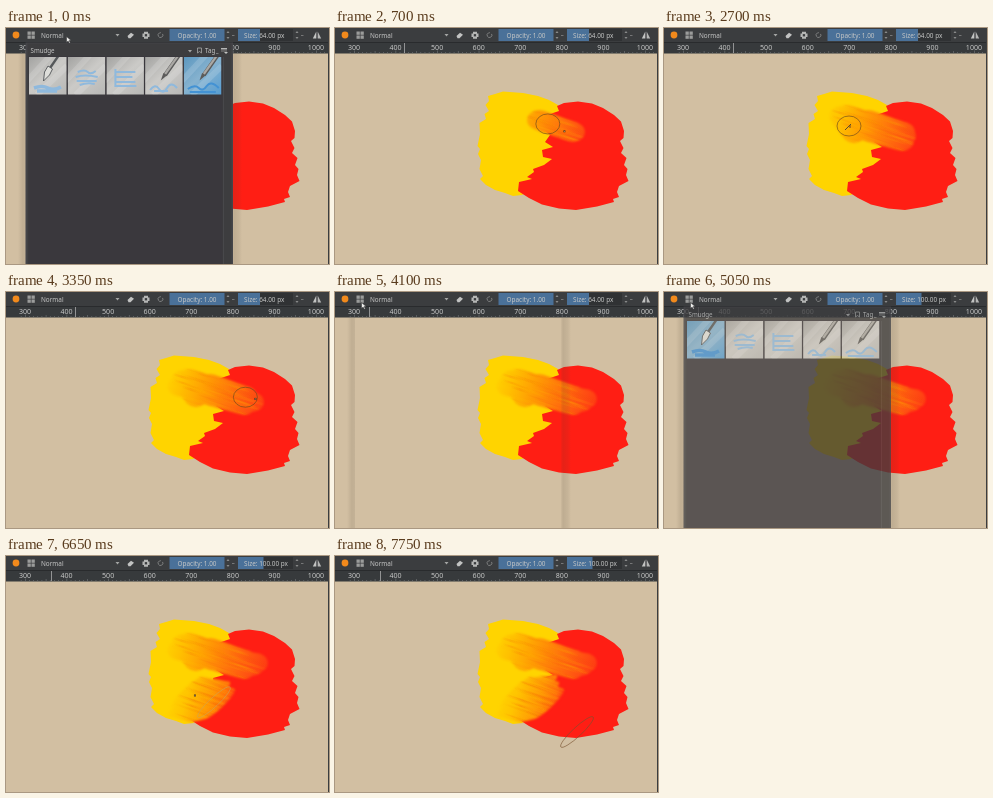
An HTML page with a canvas that plays this animation: 323x236 px, repeating every 7800 ms.

```html
<!DOCTYPE html>
<html>
<head>
<meta charset="utf-8">
<style>
html, body { margin: 0; width: 100%; height: 100%; overflow: hidden; background: #d2bfa2; }
canvas { display: block; }
</style>
</head>
<body>
<canvas id="stage" width="323" height="236"></canvas>
<script>
const W = 323, H = 236, LOOP = 7800, TAU = Math.PI * 2;
const g = document.getElementById('stage').getContext('2d');
const FONT = '"Noto Sans", "Open Sans", sans-serif';

const layer = () => Object.assign(document.createElement('canvas'), { width: W, height: H }).getContext('2d');
const clamp = v => Math.max(0, Math.min(1, v));
const ease = u => u * u * (3 - 2 * u);

function rect(c, x, y, w, h) { g.fillStyle = c; g.fillRect(x, y, w, h); }

function text(s, x, y, size = 6.4, color = '#c6c7c6', align = 'left') {
  g.font = `${size}px ${FONT}`;
  g.textAlign = align;
  g.textBaseline = 'alphabetic';
  g.fillStyle = color;
  g.fillText(s, x, y);
}

function shape(d, fill, stroke, width = 1) {
  const p = new Path2D(d);
  if (fill) { g.fillStyle = fill; g.fill(p); }
  if (stroke) { g.strokeStyle = stroke; g.lineWidth = width; g.stroke(p); }
}

function ramp(c, x0, y0, x1, y1, stops) {
  const r = c.createLinearGradient(x0, y0, x1, y1);
  stops.forEach(([at, color]) => r.addColorStop(at, color));
  return r;
}

// Pointer path: time, x, y
const KEYS = [
  [0, 61, 10], [140, 61, 10], [330, 238, 104], [560, 204, 92], [780, 240, 108],
  [960, 192, 91], [1160, 239, 106], [1350, 188, 99], [1560, 238, 113],
  [1760, 183, 87], [2000, 239, 104], [2250, 177, 88], [2450, 190, 105],
  [2600, 185, 98], [2710, 185, 98], [2920, 246, 110], [3120, 173, 94],
  [3330, 250, 107], [3500, 235, 104], [3920, 27, 12], [4150, 27, 12],
  [4450, 42, 49], [4650, 42, 49], [4900, 27, 12], [5120, 27, 12],
  [5560, 232, 148], [5700, 212, 148], [5880, 181, 136], [6060, 208, 141],
  [6220, 178, 145], [6400, 200, 151], [6540, 213, 148], [6700, 182, 137],
  [6860, 206, 134], [6960, 206, 136], [7270, 236, 174], [7500, 242, 176], [LOOP, 242, 176]
];

function pointer(t) {
  let i = 1;
  while (i < KEYS.length - 1 && KEYS[i][0] < t) i++;
  const [a, x, y] = KEYS[i - 1], [b, x2, y2] = KEYS[i];
  const s = ease(clamp((t - a) / (b - a)));
  return [x + (x2 - x) * s, y + (y2 - y) * s];
}

const LAG = 70;
const ROUND = [12, 10, 0], FLAT = [22, 4.5, -0.75];

function nib(path, [x, y], [rx, ry, angle]) {
  path.moveTo(x + rx * Math.cos(angle), y + rx * Math.sin(angle));
  path.ellipse(x, y, rx, ry, angle, 0, TAU);
}

// Blended paint with soft bristle streaks, running down a slight slope
function blend(x0, y0, x1, y1, stops, seed) {
  const c = layer();
  const rnd = () => (seed = (seed * 16807) % 2147483647) / 2147483647;
  c.fillStyle = ramp(c, x0, y0, x1, y1, stops);
  c.fillRect(0, 0, W, H);
  c.filter = 'blur(.6px)';
  const slope = (y1 - y0) / (x1 - x0);
  for (let i = 0; i < 70; i++) {
    const x = x0 + rnd() * (x1 - x0) * .7, len = 15 + rnd() * 35;
    const y = (y0 + y1) / 2 + (x - (x0 + x1) / 2) * slope + (rnd() - .5) * 56;
    const hue = rnd() < .5 ? '255,190,0' : '240,80,10';
    c.strokeStyle = ramp(c, x, y, x + len, y, [[0, `rgba(${hue},0)`], [.5, `rgba(${hue},.16)`], [1, `rgba(${hue},0)`]]);
    c.lineWidth = 1 + rnd() * 2;
    c.beginPath();
    c.moveTo(x, y);
    c.lineTo(x + len, y + len * slope);
    c.stroke();
  }
  return c.canvas;
}

const upper = blend(162, 83, 265, 116, [[0, '#ffd200'], [.15, '#ffc000'], [.38, '#ff9a04'], [.6, '#ff740c'], [.8, '#ff5212'], [1, '#ff3414']], 17);
const lower = blend(168, 133, 226, 153, [[0, '#ffd200'], [.25, '#ffc400'], [.6, '#ff9a06'], [.85, '#ff6d0c'], [1, '#ff2c14']], 91);
const mask = layer();

function smear(texture, brush, from, to, t) {
  if (t < from) return;
  const path = new Path2D();
  for (let s = from, end = Math.min(t, to); s <= end; s += 8) nib(path, pointer(s - LAG), brush);
  mask.globalCompositeOperation = 'source-over';
  mask.clearRect(0, 0, W, H);
  mask.filter = 'blur(1.3px)';
  mask.fill(path);
  mask.filter = 'none';
  mask.globalCompositeOperation = 'source-in';
  mask.drawImage(texture, 0, 0);
  g.drawImage(mask.canvas, 0, 0);
}

const YELLOW = 'M160 66L168 63.5L188 65L203 68L214 72L223 77L224 83L216 88L222 130L197 160L187 167L178 168L170 165L160 162L151 157L145 151L148 148L144.5 141L146 132L143 126L145 121L142.5 118L145 106L144.5 95L151 91L149.5 86L154 83L150.5 77L154 73L153 68Z';
const RED = 'M222 78L229 75L243 73.5L257 75.5L268 80L279 87L286 93.5L289 103L288.5 110L285 113L288.5 120L286 125L291.5 130L289 137L292.5 141L291 147L293.5 153L284 158L282 164L284 169L278 171L279 174L262 178.5L241 182L224 180.5L207 176.5L194 170L183 163L184 154L197 151L192 149L199 144L198 141L209 137L217 131L208 129L207 122L218 119L210 114L215 107L208 100L213 92L209 88L224 83Z';

const BAR = '#3b3d3f', DARK = '#373a3c';

function ruler(t) {
  rect(DARK, 0, 14, W, 11.5);
  rect('#292b2d', 0, 14, W, 1);
  for (let i = -1; i < 80; i++) {
    const x = 19 + i * 4.157;
    rect('#75787a', x, i % 10 ? i % 5 ? 24 : 23 : 22.5, .6, i % 10 ? i % 5 ? 1.5 : 2.5 : 3);
  }
  for (let i = 0; i < 8; i++) text(300 + i * 100, 19 + i * 41.57, 22, 7.1, '#c6c7c6', 'center');
  rect('#a9abab', t < 4000 ? 69 : t < 5150 ? 34 : 45, 15, .8, 10);
}

function toolbar(t) {
  const big = t >= 4600;
  rect(BAR, 0, 0, W, 14);
  g.fillStyle = '#f28a1c';
  g.beginPath();
  g.arc(10, 7, 3.4, 0, TAU);
  g.fill();
  for (const x of [21.5, 25.5]) for (const y of [3.5, 7.5]) rect('#9b9c9b', x, y, 3.3, 3.3);
  text('Normal', 35, 9.6);
  shape('M109.5 6h4l-2 2.5z', '#a5a6a5');
  shape('M121.5 8l3.5-3.2 3 2-3.5 3.4h-2z', '#c2c3c2');
  shape('M136.5 5.5h7v3.6h-7zM138 3.7h4v7h-4z', '#b5b6b5');
  rect(BAR, 138.8, 6.1, 2.3, 2.3);
  g.strokeStyle = '#858686';
  g.lineWidth = .9;
  g.beginPath();
  g.arc(154.5, 7.1, 2.4, -.5, 4.9);
  g.stroke();
  rect('#4a7199', 163.5, 1, 55, 12);
  text('Opacity: 1.00', 171.6, 9.6);
  rect('#303234', 232, 1, 55, 12);
  rect('#4a7199', 232, 1, big ? 25.5 : 22, 12);
  text(`Size: ${big ? '100' : '64'}.00 px`, 238, 9.6);
  for (const x of [222, 291]) {
    shape(`M${x - 1.5} 5h3l-1.5 -2zM${x - 1.5} 9h3l-1.5 2z`, '#8b8c8c');
    rect('#858686', x + 4, 7, 2.5, .8);
  }
  shape('M310.3 3.5v7h-3.5z', '#c2c3c2');
  shape('M311.7 3.5v7h3.5z', '#b5b6b5');
}

const MARKS = [
  'M5 31q8-3 14 0t13-1M8 34h20',
  'M10 15q7-3 10 0t8-1M8 20q9-3 22 0M9 24h20M12 28q8-3 15-1',
  'M9 12v18M10 15h19M10 20h16M9 25h20M10 29h20',
  'M5 33q5-7 9-1t8-1t10 0M9 34h14',
  'M4 32q7-5 11-1t8-2t12 2M6 35h26'
];

function thumb(i, chosen) {
  g.save();
  g.translate(23 + i * 38.7, 29);
  g.beginPath();
  g.rect(0, 0, 37.5, 37.5);
  g.clip();
  g.fillStyle = ramp(g, 0, 0, 34, 38, chosen
    ? [[0, '#5c97bf'], [.5, '#86b2cf'], [1, '#5a9fd2']]
    : [[0, '#a3a3a1'], [.5, '#cbcac7'], [1, '#b9b9b7']]);
  g.fillRect(0, 0, 38, 38);
  shape('M-2 24L22 -2M8 38L38 9', null, 'rgba(255,255,255,.14)', 6);
  g.filter = 'blur(.5px)';
  shape(MARKS[i], null, chosen ? '#4392d4' : '#8fb9dd', i ? 2 : 3.5);
  g.filter = 'none';
  if (i === 0) {
    shape('M30 -2L21 11', null, '#55585a', 2.4);
    shape('M19 9l4.5 3-3 6-6 6 1-9z', '#dededa', '#505356', .9);
  } else if (i > 2) {
    shape('M34 -2L20 18', null, '#5a5a5a', 4);
    shape('M33.5 -2L20 17', null, '#aaa8a4', 2.2);
    shape('M18.3 16l3.4 2.5-6 5z', '#5c5b5a');
  }
  g.restore();
}

// Header and presets, painted once for each possible selection
function makeSheet(chosen) {
  g.clearRect(0, 0, W, H);
  rect('#454549', 19.5, 14.5, 207.5, 222);
  rect('#3d3d3f', 21.5, 15.5, 204, 221);
  rect('#3a383d', 22.5, 28, 194, 208);
  rect('#48484b', 217, 29, 1, 207);
  text('Smudge', 24.5, 25, 6.2);
  shape('M182 22h4l-2 2.5z', '#a5a6a5');
  shape('M191.5 20h4v5l-2-1.5-2 1.5z', null, '#a5a6a5', .8);
  text('Tag', 199, 25, 6.2);
  rect('#8b8c8c', 210, 25, 2.5, .8);
  rect('#b5b6b5', 215, 20, 6, 1.5);
  rect('#858686', 215, 22.5, 6, 1);
  shape('M218 24h4l-2 2z', '#c2c3c2');
  for (let i = 0; i < 5; i++) thumb(i, i === chosen);
  const c = layer();
  c.drawImage(g.canvas, 0, 0);
  return c.canvas;
}
const sheets = { 0: makeSheet(0), 4: makeSheet(4) };

function shadow(x, w, dark, stops) {
  g.fillStyle = ramp(g, x, 0, x + w, 0, stops.map(([at, a]) => [at, `rgba(70,60,45,${a * dark})`]));
  g.fillRect(x, 26, w, 210);
}

function popup(t) {
  const early = t < 2000;
  const alpha = early ? clamp((160 - t) / 110) : clamp((t - 4110) / 120) * clamp((5180 - t) / 165);
  const shade = early ? alpha : clamp((t - 4050) / 50) * clamp((5260 - t) / 160);
  if (shade) {
    shadow(12, 8, shade, [[0, 0], [.6, .13], [1, .1]]);
    shadow(226, 10, shade, [[0, .04], [.2, .14], [.7, .08], [1, 0]]);
  }
  g.globalAlpha = alpha;
  g.drawImage(sheets[t > 4600 ? 0 : 4], 0, 0);
  g.globalAlpha = 1;
}

function cursors(t) {
  const ring = pointer(t - LAG), [x, y] = pointer(t);
  const open = t < 160 || (t > 4050 && t < 5200);
  if (ring[1] > 30 && !open) {
    const path = new Path2D();
    nib(path, ring, t < 4600 ? ROUND : FLAT);
    g.strokeStyle = t < 4600 ? 'rgba(105,72,32,.8)' : t < 6960 ? 'rgba(200,165,90,.7)' : 'rgba(120,82,48,.8)';
    g.lineWidth = .8;
    g.stroke(path);
  }
  if (y < 26 || open) {
    shape(`M${x - .5} ${y - 1.5}v6l1.6-1.4 1.2 2.2 1-.5-1.1-2.2h2z`, '#eeeeec', '#2c2d2e', .5);
  } else if (t > 2500 && t < 2760) {
    shape(`M${x - 4} ${y + 4}L${x + 2} ${y - 2}M${x + 1} ${y - 1}v3`, null, '#5c4a2c', 1);
  } else if (t < 7200) {
    rect('#4c3520', x - 1, y - 1, 2, 2);
    rect('#d8c9a8', x - .3, y - .3, .7, .7);
  }
}

function draw(t) {
  rect('#d2bfa2', 0, 0, W, H);
  shape(YELLOW, '#ffd400');
  shape(RED, '#ff1e14');
  smear(upper, ROUND, 390, 3400, t);
  smear(lower, FLAT, 5770, 6960, t);
  ruler(t);
  popup(t);
  toolbar(t);
  rect(BAR, 322, 14, 1, 222);
  cursors(t);
}

const start = performance.now();
function tick() {
  draw((performance.now() - start) % LOOP);
  requestAnimationFrame(tick);
}
tick();
</script>
</body>
</html>
```
